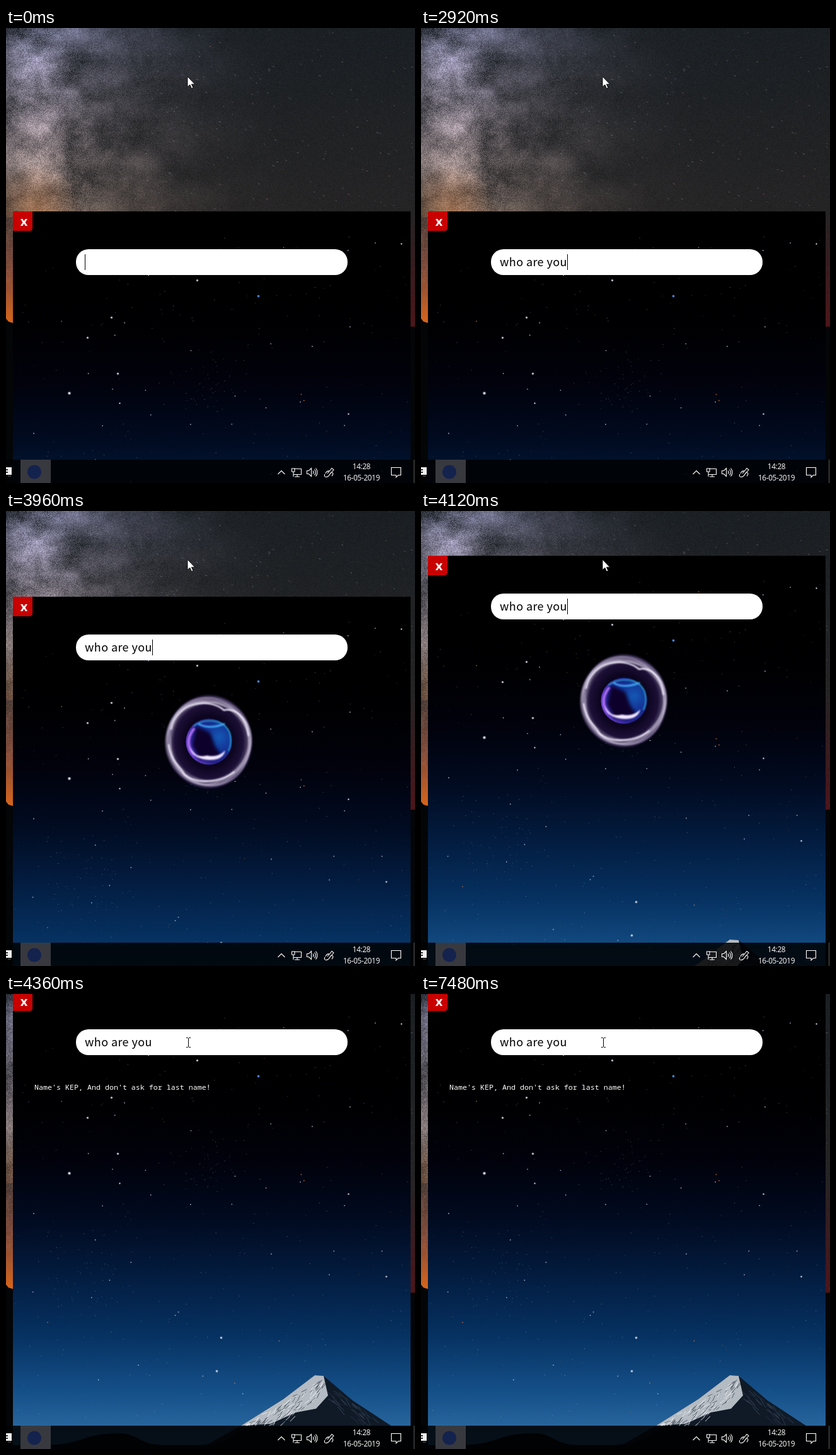
Write an HTML page with a canvas that moves like this. It is 649 by 722 pixels and loops after 8 s.

```html
<!DOCTYPE html>
<html lang="en">
<head>
<meta charset="utf-8">
<title>Assistant search</title>
<style>
html, body { margin: 0; width: 100%; height: 100%; overflow: hidden; background: #000; }
#stage { position: relative; width: 649px; height: 722px; overflow: hidden; }
#stage > * { position: absolute; left: 0; top: 0; }
#stage > #sky { left: 11px; }
#query { font: 18px 'Noto Sans CJK JP', 'Noto Sans', sans-serif; letter-spacing: .4px; white-space: pre; }
#answer { font: 11.67px 'Noto Sans Mono', monospace; fill: #fff; }
#clock { font: 11.8px 'Open Sans', sans-serif; letter-spacing: -.35px; fill: #fff; text-anchor: middle; }
#close { font: bold 20px 'Open Sans', sans-serif; fill: #fff; text-anchor: middle; }
.line { fill: none; stroke: #fff; stroke-width: 1.1; }
</style>
</head>
<body>
<div id="stage">
<canvas id="desk" width="649" height="722"></canvas>
<canvas id="sky" width="631" height="730"></canvas>
<svg width="649" height="722" viewBox="0 0 649 722">
  <defs>
    <radialGradient id="halo">
      <stop offset="0" stop-color="#05020f"/>
      <stop offset=".55" stop-color="#0d0520"/>
      <stop offset=".76" stop-color="#1c0f36"/>
      <stop offset=".86" stop-color="#4a3d60"/>
      <stop offset=".93" stop-color="#54466e"/>
      <stop offset="1" stop-color="#1c1038" stop-opacity="0"/>
    </radialGradient>
    <radialGradient id="core" cx=".72" cy=".4" r=".75">
      <stop offset="0" stop-color="#1458b4"/>
      <stop offset=".45" stop-color="#142e92"/>
      <stop offset=".75" stop-color="#24208a"/>
      <stop offset="1" stop-color="#6d40d0"/>
    </radialGradient>
    <filter id="soft" x="-30%" y="-30%" width="160%" height="160%"><feGaussianBlur stdDeviation=".8"/></filter>
    <filter id="haze" x="-30%" y="-30%" width="160%" height="160%"><feGaussianBlur stdDeviation="2.5"/></filter>
  </defs>
  <g id="panel">
    <path d="M11 0H42V26Q42 31 37 31H11Z" fill="#c80000"/>
    <text id="close" x="28.5" y="23">x</text>
    <rect x="111" y="60" width="431" height="41" rx="20" fill="#fff"/>
    <text id="query" x="125" y="87" fill="#000"></text>
    <rect id="caret" y="68" width="1" height="25" fill="#000"/>
    <text id="answer" x="45" y="156">Name's KEP, And don't ask for last name!</text>
    <g id="orb" fill="none" stroke-linecap="round" transform="translate(322 230)">
      <ellipse rx="71" ry="76" fill="url(#halo)"/>
      <g id="wisps" stroke="#efe8fa" filter="url(#soft)"></g>
      <path d="M-60 -20C-50 -65 0 -70 24 -50C40 -54 60 -40 63 -10" stroke="#f4f0ff" stroke-width="2.4" filter="url(#soft)"/>
      <path d="M-64 5C-60 35 -45 38 -39 52C-22 68 18 66 40 48" stroke="#f4f0ff" stroke-width="2.2" filter="url(#soft)"/>
      <circle r="36.5" fill="url(#core)"/>
      <path d="M-20 -24L2 -14L10 8L20 22L-14 28L-26 6Z" fill="#08042a" filter="url(#haze)"/>
      <g filter="url(#soft)">
        <path d="M-24 -25C-6 -38 24 -36 33 -14Q37 2 31 14" stroke="#2aa6cc" stroke-width="1.8"/>
        <path d="M-16 -28Q0 -19 24 -28" stroke="#3fa4f0" stroke-width="3"/>
        <path d="M-24 -20C-36 -5 -34 10 -24 20" stroke="#ab6df0" stroke-width="4"/>
        <path d="M-30 8C-24 22 -15 25 -3 22Q14 26 26 14Q22 30 0 29C-15 28 -27 23 -30 8Z" fill="#f4e8ff"/>
      </g>
    </g>
  </g>
  <rect y="685" width="649" height="37" fill="#010203" fill-opacity=".87"/>
  <rect x="23" y="685" width="48" height="37" fill="#38393f"/>
  <circle cx="45" cy="704.5" r="11" fill="#14224e"/>
  <path d="M0 697H9V709H0Z" fill="#eee"/>
  <path d="M0 701h3M0 705h3M3 711h5" stroke="#333" stroke-width="2"/>
  <g class="line">
    <path d="M431.500 708L437 702.500L442.500 708"/>
    <path d="M457 699.500H468.500V708.500H456M462 708.500V712M458 712H466M453.500 699V704H458V699ZM456 704V712"/>
    <path d="M477.500 702.500H480.500L484.500 698.500V711.500L480.500 707.500H477.500ZM487 702.500Q489 705 487 707.500M489.500 700.500Q493 705 489.500 709.500M491.500 698.500Q496.500 705 491.500 711.500"/>
    <path d="M510 707L517 698.500L520 701L513 709M506 708C503 714 511 714 514 708S521 707 517 711M507 707Q509 702 513 703"/>
    <path d="M611.500 697.500H626.500V709.500H622.500L619 713V709.500H611.500Z"/>
  </g>
  <path d="M647.500 685V722" stroke="#55585c"/>
  <g id="clock"><text x="564" y="700">14:28</text><text x="564" y="718">16-05-2019</text></g>
  <path id="arrow" d="M288 77V93.500L291.800 90L294.500 96L297 95L294.400 89.200H299.700Z" fill="#fff" stroke="#000" stroke-width=".9"/>
  <path id="beam" d="M286 69.500H288.500L289.500 70.500L290.500 69.500H293M289.500 70V84M286 84.500H288.500L289.500 83.500L290.500 84.500H293" fill="none" stroke="#000"/>
</svg>
</div>
<script>
const $ = id => document.getElementById(id);
const mix = (a, b, u) => a + (b - a) * u;
const bell = u => Math.exp(-u * u);

function seeded(s) {
  return () => {
    s = (s + 0x6D2B79F5) | 0;
    let t = Math.imul(s ^ s >>> 15, 1 | s);
    t = t + Math.imul(t ^ t >>> 7, 61 | t) ^ t;
    return ((t ^ t >>> 14) >>> 0) / 4294967296;
  };
}

function fade(c, y0, y1, ...cols) {
  const g = c.createLinearGradient(0, y0, 0, y1);
  cols.forEach((col, i) => g.addColorStop(i / (cols.length - 1), col));
  return g;
}

function shape(c, pts, fill) {
  c.fillStyle = fill;
  c.beginPath();
  pts.forEach(([x, y]) => c.lineTo(x, y));
  c.fill();
}

function dash(c, x, y, dx, dy, col) {
  c.strokeStyle = col;
  c.beginPath();
  c.moveTo(x, y);
  c.lineTo(x + dx, y + dy);
  c.stroke();
}

function dot(c, x, y, r, rgb, a) {
  c.fillStyle = `rgba(${rgb},${a})`;
  c.beginPath();
  c.arc(x + .5, y + .5, r, 0, 7);
  c.fill();
}

// Smooth cloud noise, about 0 to 1
function cloudNoise(rnd) {
  const grid = Float32Array.from({ length: 4096 }, rnd);
  const at = (x, y) => grid[(y & 63) * 64 + (x & 63)];
  const smooth = u => u * u * (3 - 2 * u);
  const layer = (x, y) => {
    const i = Math.floor(x), j = Math.floor(y), u = smooth(x - i), v = smooth(y - j);
    return mix(mix(at(i, j), at(i + 1, j), u), mix(at(i, j + 1), at(i + 1, j + 1), u), v);
  };
  return (x, y) => {
    let sum = 0;
    for (let k = 0, f = 1 / 55, a = .5; k < 4; k++, f *= 2.1, a *= .6) sum += a * layer(x * f, y * f);
    return sum / 1.09;
  };
}

function paintDesk() {
  const c = $('desk').getContext('2d'), rnd = seeded(7), cloud = cloudNoise(rnd);
  const img = c.createImageData(649, 476);
  for (let y = 0, p = 0; y < 476; y++) {
    const low = Math.min(1, y / 290), dusk = Math.max(0, (y - 290) / 186);
    for (let x = 0; x < 649; x++, p += 4) {
      const band = .44 * bell((x - 60) / 190) + .3 * bell((x - 35 - y * .1) / 60);
      const light = band * Math.max(.3, 2.4 * cloud(x, y) - .2);
      const grain = (rnd() - .5) * (10 + 75 * band);
      img.data[p] = mix(26, 37, low) + light * mix(112, 128, low) + grain + dusk * 40;
      img.data[p + 1] = mix(31, 36, low) + light * mix(108, 106, low) + grain - dusk * 16;
      img.data[p + 2] = mix(35, 37, low) + light * mix(138, 92, low) + grain - dusk * 12;
      img.data[p + 3] = 255;
    }
  }
  c.putImageData(img, 0, 0);
  const warm = c.createRadialGradient(45, 290, 0, 45, 290, 75);
  warm.addColorStop(0, 'rgba(205,120,60,.42)');
  warm.addColorStop(1, 'rgba(205,120,60,0)');
  c.fillStyle = warm;
  c.fillRect(0, 200, 140, 100);
  c.fillStyle = fade(c, 290, 468, 'rgba(110,75,55,.2)', 'rgba(130,70,45,.6)', '#d8661a');
  c.fillRect(0, 290, 11, 180);
  for (let i = 0; i < 190; i++) {
    const rgb = rnd() < .15 ? '205,150,120' : '180,184,195', n = 1.5 + rnd() * 2;
    dash(c, 180 + rnd() * 465, rnd() * 290, n, n * .4, `rgba(${rgb},${.12 + .33 * rnd()})`);
  }
  shape(c, [[0, 461], [4, 466], [11, 468], [649, 474], [649, 722], [0, 722]], '#040506');
}

// The few brightest stars: x, y, radius
const BRIGHT = [
  [400, 130, 1.9], [100, 284, 2.3], [129, 196, 1.6], [167, 164, 1.6], [177, 253, 1.7], [303, 105, 1.6],
  [341, 545, 1.8], [334, 598, 1.8], [603, 448, 1.4], [543, 317, 1.3], [627, 47, 1.2], [180, 300, 1.2]
];

function paintSky() {
  const c = $('sky').getContext('2d'), rnd = seeded(21);
  c.fillStyle = fade(c, 0, 730, '#000', '#000', '#000002', '#01020c', '#010b21', '#031d41', '#063262', '#16518a', '#3674ab');
  c.fillRect(0, 0, 631, 730);
  c.translate(-11, 4);
  const cluster = (n, x, y, w, h) => {
    for (let i = 0; i < n; i++)
      dot(c, x + (rnd() + rnd() - 1) * w, y + (rnd() + rnd() - 1) * h, .6, '150,165,195', .2 + rnd() * .35);
  };
  for (let i = 0; i < 290; i++) {
    const big = i < 45, rgb = rnd() < .12 ? '205,130,80' : '190,200,222';
    dot(c, 11 + rnd() * 631, 35 + rnd() * 640, big ? .9 : .6, rgb, big ? .8 : .15 + rnd() * .4);
  }
  cluster(45, 325, 265, 70, 60);
  cluster(55, 135, 450, 90, 80);
  BRIGHT.forEach(([x, y, r], i) => {
    const rgb = i ? '232,232,245' : '90,160,255';
    dot(c, x, y, r * 1.25, rgb, .3);
    dot(c, x, y, r * .75, rgb, .9);
  });
  paintMountain(c, rnd);
}

function paintMountain(c, rnd) {
  shape(c, [[373, 685], [440, 643], [490, 605], [504, 606], [550, 645], [614, 687], [649, 726], [300, 726]], '#101a27');
  shape(c, [[373, 685], [440, 643], [490, 605], [504, 606], [511, 637], [492, 658], [460, 664], [420, 682]], '#b4bbc2');
  for (let i = 0; i < 130; i++) {
    const u = rnd(), x = mix(385, 508, u), y = mix(681, 608, u) + rnd() * 34 * Math.sin(u * 2.8);
    dash(c, x, y, -3 - rnd() * 6, 3 + rnd() * 6, rnd() < .55 ? 'rgba(40,50,62,.7)' : 'rgba(240,244,248,.85)');
  }
  for (let i = 0; i < 40; i++) {
    const u = rnd();
    dash(c, mix(508, 590, u), mix(618, 675, u) + rnd() * 25, 5 + rnd() * 9, 5 + rnd() * 8, `rgba(100,120,145,${.15 + rnd() * .35})`);
  }
  c.fillStyle = '#04070b';
  for (let x = 11; x < 642; x++) {
    const y = 716 - 17 * bell((x - 155) / 45) - 9 * bell((x - 195) / 25) - 33 * bell(Math.max(0, 400 - x) / 45);
    c.fillRect(x, Math.max(y, 686), 1, 50);
  }
}

function weaveOrb() {
  let out = '';
  for (let k = 0; k < 9; k++) {
    let d = '';
    for (let a = 0; a <= 72; a++) {
      const q = a * Math.PI / 36, r = 63 + k % 4 + 3.2 * Math.sin((1 + k % 3) * q + k * 1.7);
      d += `${a ? 'L' : 'M'}${(r * Math.cos(q)).toFixed(1)} ${(r * 1.02 * Math.sin(q)).toFixed(1)}`;
    }
    out += `<path d="${d}" stroke-width="${1 + k % 3 * .5}" opacity="${.22 + k % 2 * .2}"/>`;
  }
  $('wisps').innerHTML = out;
}

const LOOP = 8000, PHRASE = 'who are you', OPEN = 3840, DONE = 4360, BLINK = 520;
const KEYS = [840, 1440, 1600, 1760, 1880, 2080, 2160, 2400, 2600, 2800, 2920];
const SLIDE = [[3880, 291], [3960, 136], [4120, 71], [DONE, -4]];

function panelTop(t) {
  const s = Math.floor(t / 40) * 40, i = SLIDE.findIndex(([at]) => at > s);
  if (i === 0) return SLIDE[0][1];
  if (i < 0) return SLIDE[SLIDE.length - 1][1];
  const [t0, y0] = SLIDE[i - 1], [t1, y1] = SLIDE[i];
  return Math.round(mix(y0, y1, (s - t0) / (t1 - t0)));
}

function caretOn(t) {
  if (t < DONE) return t < 440 || t >= KEYS[0];
  return Math.floor((t - DONE) / BLINK) % 2 === 1;
}

const show = (id, on) => { $(id).style.visibility = on ? 'visible' : 'hidden'; };

function render(t) {
  const top = panelTop(t), query = $('query');
  $('sky').style.transform = `translateY(${top}px)`;
  $('panel').setAttribute('transform', `translate(0 ${top})`);
  const typed = PHRASE.slice(0, KEYS.filter(at => at <= t).length).replace(/ /g, '\u00a0');
  if (query.textContent !== typed) query.textContent = typed;
  $('caret').setAttribute('x', 125 + (typed ? Math.round(query.getComputedTextLength()) : 0));
  show('caret', caretOn(t));
  show('orb', t >= OPEN && t < DONE);
  show('answer', t >= DONE);
  show('beam', top < 17);
  show('arrow', top >= 17);
}

paintDesk();
paintSky();
weaveOrb();
const start = performance.now();
function tick() {
  render((performance.now() - start) % LOOP);
  requestAnimationFrame(tick);
}
tick();
</script>
</body>
</html>
```
